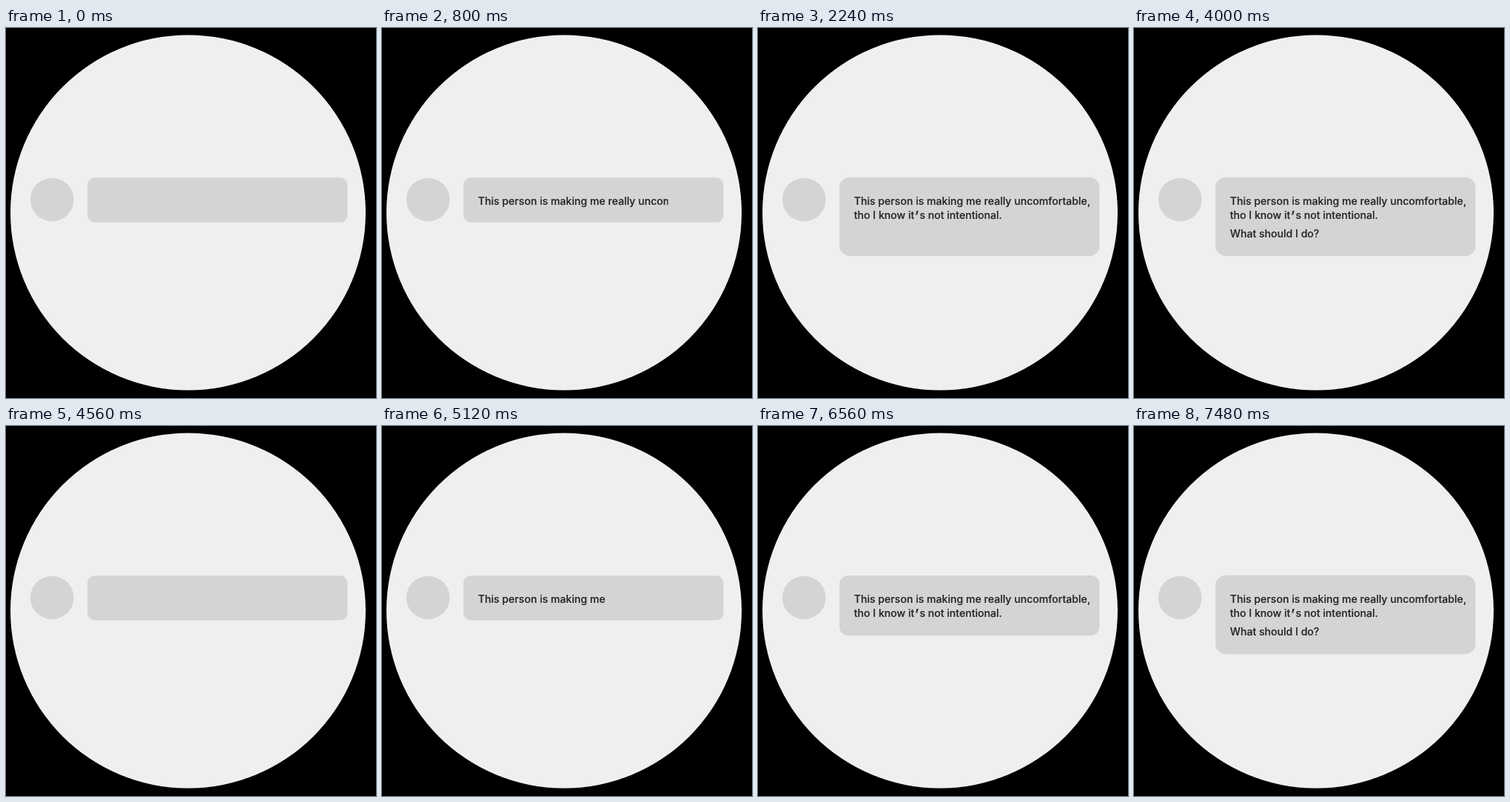
Recreate the animation shown at these times as an HTML page. Size 500 px wide and 500 px high, loop 8 s.

```html
<!DOCTYPE html>
<html lang="en">
<head>
<meta charset="utf-8">
<title>Message typing</title>
<style>
  html, body { margin: 0; height: 100%; overflow: hidden; background: #000; }
  svg { display: block; width: 500px; height: 500px; }
  text { font: 500 14.1px Inter, "Noto Sans", sans-serif; fill: #232323; stroke: #232323; stroke-width: .15px; }
  .mark { font-size: 19px; }
</style>
</head>
<body>
<svg viewBox="0 0 500 500">
  <defs>
    <clipPath id="c0"><rect x="120" y="215" height="40"/></clipPath>
    <clipPath id="c1"><rect x="120" y="235" height="40"/></clipPath>
    <clipPath id="c2"><rect x="120" y="260" height="40"/></clipPath>
  </defs>
  <circle cx="246" cy="249.5" r="240" fill="#efefef"/>
  <circle cx="62.2" cy="232" r="29.3" fill="#d4d4d4"/>
  <rect id="bubble" x="110" width="351.5" fill="#d4d4d4"/>
  <text x="129.8" y="238.7" clip-path="url(#c0)">This person is making me really uncomfortable,</text>
  <text x="129.8" y="257.7" clip-path="url(#c1)">tho I know it<tspan class="mark" dx=".7" dy="3">’</tspan><tspan dx="1" dy="-3">s not intentional.</tspan></text>
  <text x="129.8" y="283" clip-path="url(#c2)">What should I do?</text>
</svg>
<script>
  const LOOP = 8000, CYCLE = 4560, LEFT = 120;

  // Right edge of each line's wipe, as [time, x] points.
  const wipes = [
    [[0, 129], [560, 305.5], [840, 400], [1080, 448], [1120, 460]],
    [[1120, 123.5], [2000, 332.5]],
    [[2240, 126], [2920, 254]]
  ];
  // Bubble steps: start time, top, height, corner radius.
  const sizes = [[0, 202.2, 60.4, 10], [1120, 202, 81.3, 12], [2240, 201.7, 106.5, 14]];

  const bubble = document.getElementById('bubble');
  const masks = document.querySelectorAll('clipPath rect');

  function edgeAt(points, t) {
    if (t <= points[0][0]) return LEFT;
    for (let i = 1; i < points.length; i++) {
      const [t0, x0] = points[i - 1], [t1, x1] = points[i];
      if (t < t1) return x0 + (x1 - x0) * (t - t0) / (t1 - t0);
    }
    return 470;
  }

  function draw(now) {
    const t = Math.floor(now % LOOP % CYCLE / 40) * 40;
    const [, y, height, rx] = sizes.filter(s => t >= s[0]).pop();
    bubble.setAttribute('y', y);
    bubble.setAttribute('height', height);
    bubble.setAttribute('rx', rx);
    masks.forEach((m, i) => m.setAttribute('width', edgeAt(wipes[i], t) - LEFT));
  }

  const start = performance.now();
  function tick() {
    draw(performance.now() - start);
    requestAnimationFrame(tick);
  }
  tick();
</script>
</body>
</html>
```
